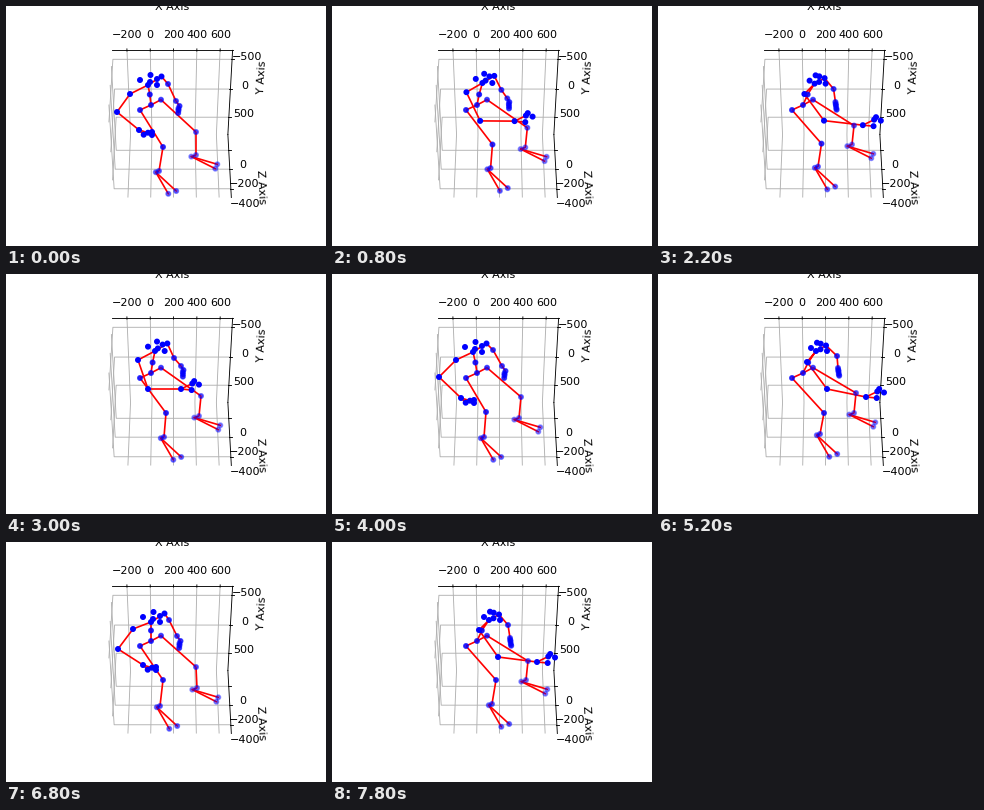
A matplotlib script for the animation above (8 s loop, 320 px wide and 240 px high).

```python
import numpy as np
import matplotlib.pyplot as plt
from matplotlib.animation import FuncAnimation

W, H, DPI = 320, 240, 80
STEP = 200
FRAMES = 40

# Seven poses of each moving joint, in stage pixels
JOINTS = {
    "neck": [(142, 79), (155, 77), (149, 77), (141, 78), (158, 77), (145, 80), (157, 78)],
    "r_shoulder": [(124, 88), (144, 88), (132, 86), (124, 86), (149, 88), (127, 87), (147, 88)],
    "r_elbow": [(111, 106), (166, 114), (142, 115), (107, 103), (169, 115), (112, 107), (166, 115)],
    "r_wrist": [(133, 124), (204, 117), (175, 115), (129, 124), (208, 123), (137, 123), (205, 120)],
    "l_elbow": [(162, 78), (174, 83), (168, 84), (161, 76), (179, 82), (163, 78), (176, 83)],
    "l_wrist": [(170, 95), (176, 96), (175, 92), (170, 92), (180, 94), (171, 94), (178, 96)],
    "r_knee": [(157, 141), (162, 137), (160, 139), (154, 138), (166, 139), (157, 138), (164, 138)],
    "l_knee": [(190, 126), (196, 121), (195, 122), (189, 123), (198, 119), (190, 125), (196, 119)],
    "r_ankle": [(153, 165), (160, 158), (158, 163), (152, 163), (162, 160), (154, 164), (160, 162)],
    "l_ankle": [(190, 149), (194, 140), (193, 142), (187, 144), (196, 139), (191, 146), (194, 138)],
}
TURN = [0, 1, 0.33, 0, 1, 0, 1]

# (time in ms, pose)
KEYS = [(0, 0), (650, 2), (1400, 1), (2000, 6), (2500, 1), (3000, 2), (3550, 0),
        (4000, 3), (4400, 2), (4800, 6), (5000, 4), (5200, 4), (5700, 6),
        (6150, 2), (6600, 5), (6800, 5), (7100, 2), (7400, 4), (7800, 6)]

# Offsets from the parent joint: turned left, turned right
HEAD = [(-8, -5), (2.5, -10), (2, -3), (9, -6), (9, 0), (13.5, -8.5)], \
       [(-5, -3), (1, -8.3), (4.5, -1.7), (4.7, -7.3), (11, 0), (10, -5.5)]
R_HAND = [(4.7, 4.7), (9, 2.7), (13, 2), (13, 5)], \
         [(10.7, 1), (11.3, -5.5), (13.2, -8), (18, -4.5)]
L_HAND = [(3.5, 5), (2.5, 7.5), (2.5, 9.3), (2.2, 12)], \
         [(0.3, 2), (0.5, 3.5), (0.8, 6), (1.2, 7.7)]
R_FOOT = [(-3.2, 1.2), (17.2, 20), (9.3, 22.8)]
L_FOOT = [(-4.7, 1.6), (21.3, 9.3), (19.3, 13.7)]

CHAINS = [
    ["pelvis", "spine", "neck", "r_shoulder", "r_elbow", "r_wrist", "r_hand1", "r_hand2"],
    ["r_wrist", "r_hand0"],
    ["neck", "head5", "l_elbow", "l_wrist", "l_hand0", "l_hand1", "l_hand2", "l_hand3"],
    ["pelvis", "r_hip", "r_knee", "r_ankle", "r_foot0", "r_foot1"],
    ["r_foot0", "r_foot2"],
    ["pelvis", "l_hip", "l_knee", "l_ankle", "l_foot0", "l_foot1"],
    ["l_foot0", "l_foot2"],
]
ALPHA = {"r_hip": 0.75, "l_hip": 0.65, "pelvis": 0.75, "spine": 0.8, "l_elbow": 0.7,
         "l_wrist": 0.65, "l_hand": 0.7, "r_knee": 0.75, "l_knee": 0.55,
         "r_ankle": 0.55, "r_foot": 0.5, "l_ankle": 0.45, "l_foot": 0.42}


def smooth(t, times, vals):
    """Cubic path through the keys that does not overshoot."""
    h = np.diff(times)
    d = np.diff(vals, axis=0) / h[:, None]
    m = np.zeros_like(vals)
    a, b = d[:-1], d[1:]
    same = a * b > 0
    m[1:-1][same] = 2 * a[same] * b[same] / (a + b)[same]
    i = min(np.searchsorted(times, t, side="right") - 1, len(h) - 1)
    s = (t - times[i]) / h[i]
    return (vals[i] * (1 + 2 * s) * (1 - s) ** 2 + vals[i + 1] * s * s * (3 - 2 * s)
            + h[i] * s * (1 - s) * (m[i] * (1 - s) - m[i + 1] * s))


TIMES = np.array([k[0] for k in KEYS], float)
ORDER = [k[1] for k in KEYS]
NAMES = list(JOINTS)
TRACKS = np.hstack([np.array(JOINTS[n], float)[ORDER] for n in NAMES]
                   + [np.array(TURN)[ORDER][:, None]])


def pose(t):
    row = smooth(t, TIMES, TRACKS)
    p = dict(zip(NAMES, row[:-1].reshape(-1, 2)))
    turn = row[-1]
    p["pelvis"] = np.array([145, 99])
    p["r_hip"] = np.array([134, 104])
    p["l_hip"] = np.array([155, 93.7])
    p["spine"] = np.array([145 + 0.4 * (p["neck"][0] - 145), 88.5])

    def attach(name, parent, left, right, u):
        offs = (1 - u) * np.array(left) + u * np.array(right)
        for i, o in enumerate(offs):
            p[f"{name}{i}"] = p[parent] + o

    attach("head", "neck", *HEAD, turn)
    attach("r_hand", "r_wrist", *R_HAND, min(1, 3 * turn))
    attach("l_hand", "l_wrist", *L_HAND, turn)
    attach("r_foot", "r_ankle", R_FOOT, R_FOOT, 0)
    attach("l_foot", "l_ankle", L_FOOT, L_FOOT, 0)
    return p


fig = plt.figure(figsize=(W / DPI, H / DPI), dpi=DPI)
box = fig.add_subplot(projection="3d")
box.view_init(elev=-45, azim=-90)
box.set(xlim=(-325, 707), ylim=(-645, 821), zlim=(-487, 173),
        xlabel="X Axis", ylabel="Y Axis", zlabel="Z Axis")
for axis in (box.xaxis, box.yaxis, box.zaxis):
    axis.set_pane_color((1, 1, 1, 0))
box.set_xticks(range(-200, 601, 200))
box.set_yticks([-500, 0, 500])
box.set_zticks([-400, -200, 0])

flat = fig.add_axes([0, 0, 1, 1])
flat.set(xlim=(0, W), ylim=(H, 0))
flat.axis("off")

start = pose(0)
lines = [flat.plot([], [], color="red", lw=1.5, zorder=1)[0] for _ in CHAINS]
colors = [(0, 0, 1, ALPHA.get(n.rstrip("0123456789"), 1)) for n in start]
dots = flat.scatter(*np.array(list(start.values())).T, s=15, c=colors, lw=1.5, zorder=2)


def draw(i):
    p = pose(i * STEP)
    for line, chain in zip(lines, CHAINS):
        line.set_data(*np.array([p[n] for n in chain]).T)
    dots.set_offsets(list(p.values()))
    return [*lines, dots]


anim = FuncAnimation(fig, draw, frames=FRAMES, interval=STEP, repeat=True, repeat_delay=0)
plt.show()
```
